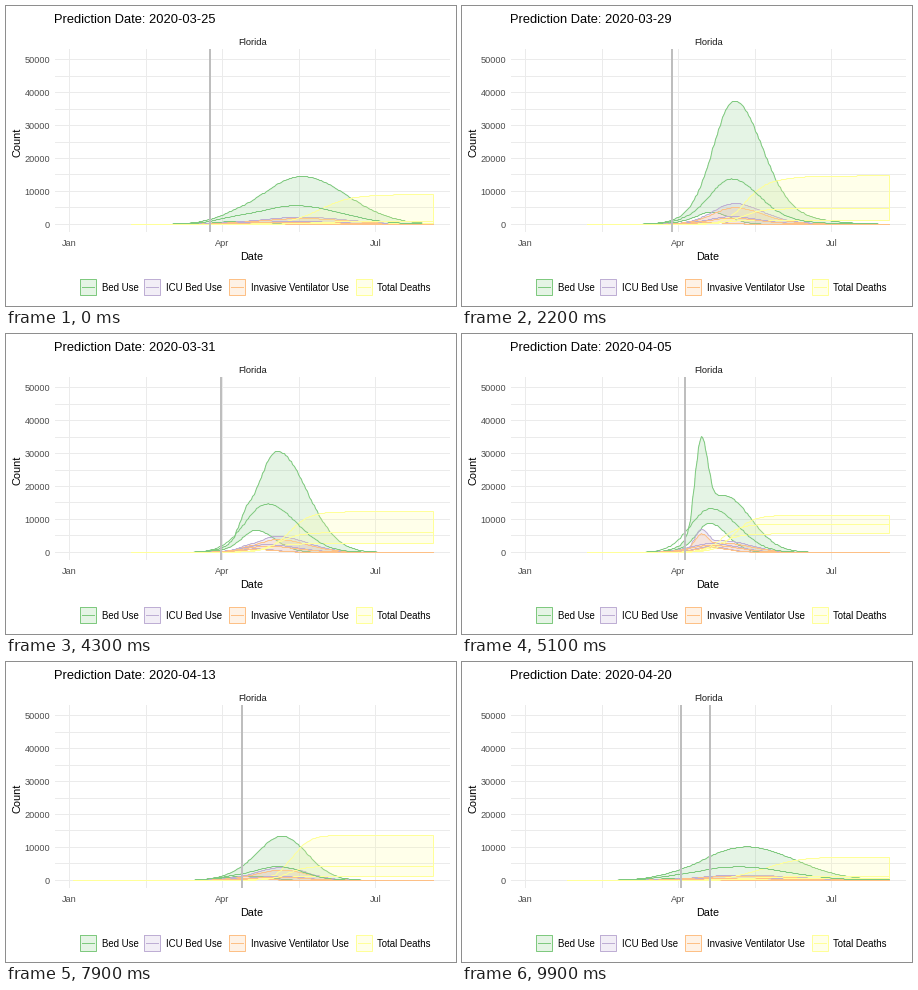
Recreate the animation shown at these times as a matplotlib script. Size 450 by 300 pixels, loop 10 s.

```python
from collections import namedtuple

import numpy as np
import matplotlib.pyplot as plt
from matplotlib.animation import FuncAnimation
from matplotlib.patches import Polygon, Rectangle

W, H, DPI = 450, 300, 100
PX = 72 / DPI                      # points per pixel
LEFT, RIGHT, TOP, BOTTOM = 49, 444, 43, 226
Y0, PER_COUNT = 218.35, 164.6 / 50000
DAY0, PER_DAY = 63.0, 1.685
COLORS = ["#7FC97F", "#BEAED4", "#FDC086", "#FFFF99"]
GRID, RULE, TICK = "#EBEBEB", "#BEBEBE", "#4D4D4D"

DATES = ["03-25", "03-26", "03-27", "03-29", "03-30", "03-31", "04-01",
         "04-05", "04-07", "04-08", "04-10", "04-13", "04-17", "04-20"]
STARTS = [4, 13, 20, *range(28, 99, 7)]   # first frame of each change
FRAMES = 100

# mean and low are shares of the upper band, icu a share of bed use;
# left and right are the widths on each side of the peak.
Release = namedtuple(
    "Release", "start end peak height left right mean low deaths icu spike")


def between(a, b, t):
    return Release(*((1 - t) * u + t * v for u, v in zip(a, b)))


EARLY, LATE = (125, 427), (67, 427)
mar25 = Release(*EARLY, 296, 14500, 41, 45, .39, .02, 9000, .15, 0)
mar29 = Release(*EARLY, 272, 45800, 21, 27, .365, .1, 16600, .17, 0)
mar30 = Release(*EARLY, 273, 33000, 20.5, 30, .44, .165, 12500, .15, 0)
apr05 = Release(*EARLY, 262, 17200, 20, 26.5, .76, .5, 11200, .2, 25600)
apr08 = Release(*LATE, 258, 14500, 18, 24, .56, .28, 8800, .2, 8000)
apr13 = Release(*LATE, 276, 13400, 25, 25, .31, .08, 13700, .29, 0)
apr20 = Release(*LATE, 240, 2100, 21, 35, .52, .3, 3200, .28, 0)


def bump(x, height, centre, left, right):
    width = np.where(x < centre, left, right)
    return height * np.exp(-((x - centre) / width) ** 2 / 2)


def forecast(r):
    """Positions and counts, indexed by series, band (upper, mean, low), point."""
    x = np.linspace(r.start, r.end, 212)
    past = bump(x, 700, 227, 18, 14)
    lean = 0.12 + 0.6 * min(1, r.spike / 8000)
    beds, dead = [], []
    # Lower bands peak earlier, nearer to x = 245
    for share, pull, squeeze in ((1, 0, 1), (r.mean, lean, 1), (r.low, .8, .65)):
        centre = r.peak + (245 - r.peak) * pull
        beds.append(past + bump(x, r.height * share, centre,
                                r.left * squeeze, r.right * squeeze))
        total = r.deaths * min(share, 5 * r.low if share < 1 else 1)
        middle, scale = centre + 0.4 * r.right, 0.35 * r.right
        dead.append(total / (1 + np.exp((middle - x) / scale)))
    beds[0] += bump(x, r.spike, 239, 6, 6.5)
    beds = np.array(beds)
    return x, np.array([beds, beds * r.icu, beds * r.icu * 0.8, dead])


STATES = [forecast(r) for r in (
    mar25, mar25, mar25, mar29, mar30,
    between(mar30, apr05, .04), between(mar30, apr05, .2), apr05, apr05,
    apr08, between(apr08, apr13, .4), apr13, between(apr13, apr20, .9), apr20)]


def date_x(date):
    month, day = map(int, date.split("-"))
    return DAY0 + PER_DAY * ({3: 60, 4: 91}[month] + day - 1)


def count_y(value):
    return Y0 - PER_COUNT * value


def snap(v):
    return np.floor(v) + 0.5


fig = plt.figure(figsize=(W / DPI, H / DPI), dpi=DPI, facecolor="white")
ax = fig.add_axes([0, 0, 1, 1])
ax.set_xlim(0, W)
ax.set_ylim(H, 0)
ax.axis("off")


def box(x, y, w, h, color, z=1, alpha=1):
    patch = Rectangle((x, y), w, h, fc=color, lw=0, alpha=alpha,
                      antialiased=False, zorder=z)
    return ax.add_patch(patch)


def label(x, y, text, size, color="black", ha="left", **kw):
    return ax.text(x, y, text, fontsize=size * PX, color=color, ha=ha,
                   va=kw.pop("va", "baseline"), family="Liberation Sans", **kw)


def stroke(x, y, color, z):
    line, = ax.plot(x, y, color=color, lw=PX, snap=False,
                    solid_capstyle="projecting", solid_joinstyle="miter",
                    zorder=z)
    return line


# Grid and axes
for value in range(0, 50001, 5000):
    y = int(count_y(value))
    box(LEFT, y, RIGHT - LEFT, 1, GRID)
    if value % 10000 == 0:
        label(44.2, y + 3.8, str(value), 9.1, TICK, "right")
for x in (63, 140, 216, 293, 369):
    box(x, TOP, 1, BOTTOM - TOP, GRID)
for x, month in ((63, "Jan"), (216.5, "Apr"), (369.5, "Jul")):
    label(x, 240, month, 9.2, TICK, "center")
label(246, 253.7, "Date", 10.8, ha="center")
label(11.5, 136.5, "Count", 11, ha="center", va="center", rotation=90)
label(246.3, 39, "Florida", 9.4, "#1A1A1A", "center")
title = label(48.5, 17, "", 12.9)

# Legend
KEYS = [(74, 95.7, "Bed Use"), (138, 159.5, "ICU Bed Use"),
        (223, 245, "Invasive Ventilator Use"), (350, 371, "Total Deaths")]
for color, (x, tx, name) in zip(COLORS, KEYS):
    box(x, 273, 17, 17, color, alpha=0.2)
    a, b, top, low = x + 0.5, x + 16.5, 273.5, 289.5
    stroke([a, b, b, a, a], [top, top, low, low, top], color, 2)
    stroke([x + 2.5, x + 14.5], [281.5, 281.5], color, 2)
    label(tx, 285.3, name, 9.7)

# Moving parts
fills, edges, means = [], [], []
for i, color in enumerate(COLORS):
    fill = Polygon([(0, 0), (1, 1), (1, 0)], fc=color, alpha=0.2, lw=0,
                   antialiased=False, zorder=3 + i / 10)
    fills.append(ax.add_patch(fill))
    edges.append(stroke([], [], color, 3.05 + i / 10))
    means.append(stroke([], [], color, 4 + i / 10))
rule, stay = (box(0, TOP, 2, BOTTOM - TOP, RULE, 5) for _ in range(2))


def place(frame):
    """Current state, next state and progress between them."""
    for i, start in enumerate(STARTS):
        steps = 4 if i == 2 else 3
        if frame < start + steps - 1:
            return i, (i + 1) % len(STATES), max(0, (frame - start + 1) / steps)
    return 0, 0, 0


def update(frame):
    now, then, p = place(frame)
    x, counts = ((1 - p) * a + p * b for a, b in zip(STATES[now], STATES[then]))
    x, y = snap(x), snap(count_y(counts))
    for fill, edge, line, (upper, mean, low) in zip(fills, edges, means, y):
        outline = np.concatenate([np.c_[x, upper], np.c_[x, low][::-1]])
        fill.set_xy(outline)
        edge.set_data(*np.vstack([outline, outline[:1]]).T)
        line.set_data(x, mean)
    here, there = date_x(DATES[now]), date_x(DATES[then])
    rule.set_x(np.floor(here + (there - here) * p) - 1)
    # The last date keeps its rule while the loop returns to the first
    stay.set_x(np.floor(here) - 1)
    stay.set_visible(then == 0 and p > 0)
    title.set_text("Prediction Date: 2020-" + DATES[then if p > 0.7 else now])
    return []


anim = FuncAnimation(fig, update, frames=FRAMES, init_func=lambda: update(0),
                     interval=100, repeat=True, repeat_delay=0, blit=False)
plt.show()
```
